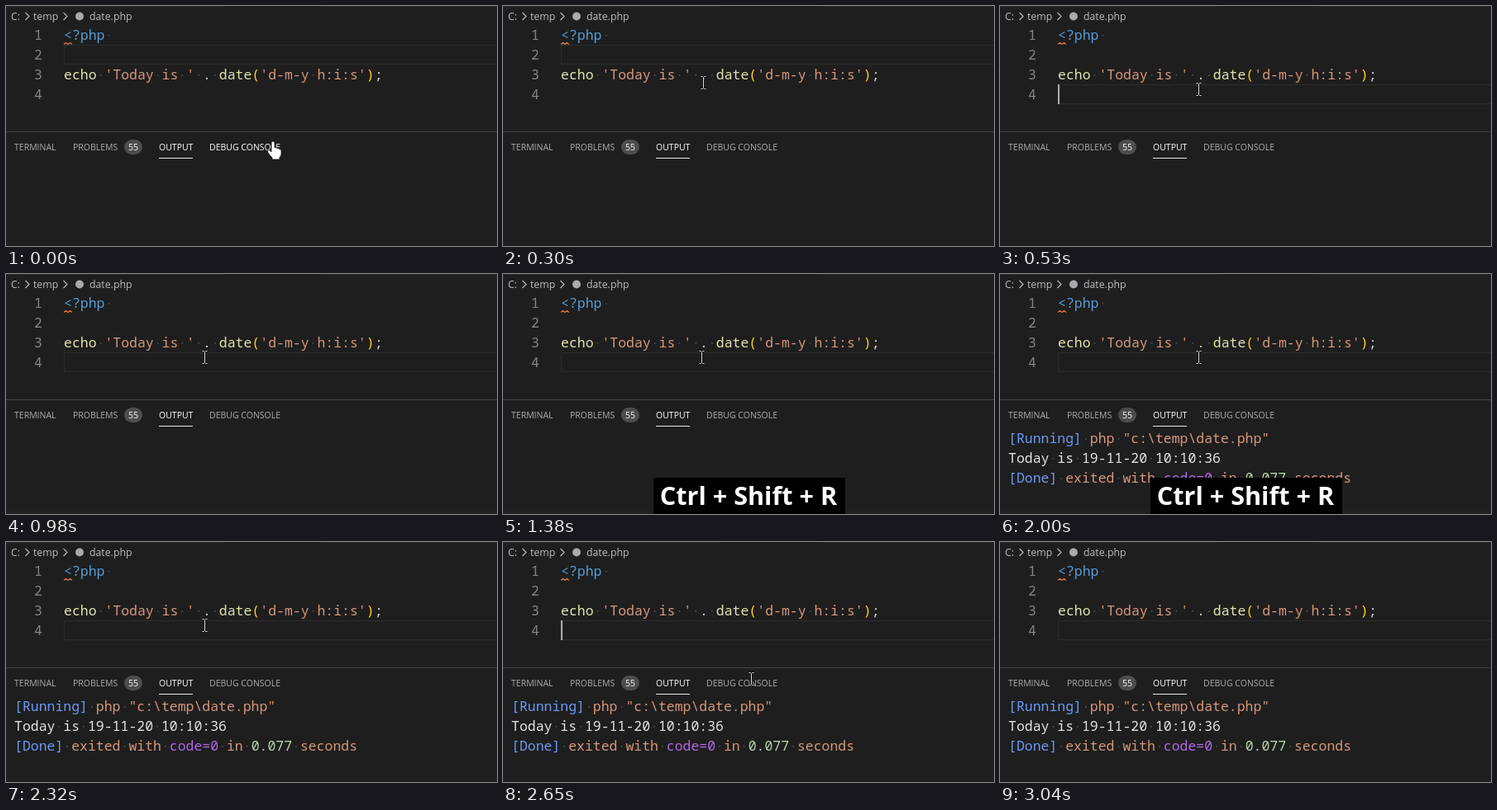
An HTML page for the animation above (3510 ms loop, 594 by 291 pixels).

```html
<!DOCTYPE html>
<html lang="en">
<head>
<meta charset="utf-8">
<title>Running a PHP script</title>
<style>
  html, body { margin: 0; width: 100%; height: 100%; overflow: hidden; background: #1e1e1e; }
  svg { display: block; width: 594px; height: 291px; }
  text { white-space: pre; }
  .mono { font: 500 16.48px "Noto Sans Mono", "DejaVu Sans Mono", monospace; }
  .crumb { font: 12.3px "Open Sans", "Noto Sans", sans-serif; fill: #bebebe; }
  .tab { font: 10.5px "Open Sans", "Noto Sans", sans-serif; fill: #adadad; }
  .tab.lit { fill: #fff; }
  .keys { font: bold 30.6px "Open Sans", "Noto Sans", sans-serif; fill: #fff; }
</style>
</head>
<body>
<svg id="stage" viewBox="0 0 594 291" xmlns="http://www.w3.org/2000/svg"></svg>
<script>
const LOOP = 3510;
const stage = document.getElementById('stage');

function add(tag, attrs, text, parent = stage) {
  const node = document.createElementNS('http://www.w3.org/2000/svg', tag);
  for (const key in attrs) node.setAttribute(key, attrs[key]);
  if (text) node.textContent = text;
  parent.appendChild(node);
  return node;
}

const rect = (x, y, width, height, fill, more) => add('rect', { x, y, width, height, fill, ...more });
const label = (kind, x, y, text) => add('text', { class: kind, x, y }, text);
const show = (node, on) => node.setAttribute('visibility', on ? 'visible' : 'hidden');

// A monospaced line from [text, colour] pairs, with spaces shown as faint dots.
function codeLine(x, y, ...parts) {
  const line = add('text', { class: 'mono', x, y });
  for (const [text, fill] of parts)
    for (const piece of text.split(/( )/))
      if (piece) add('tspan', { fill: piece === ' ' ? '#464646' : fill }, piece === ' ' ? '·' : piece, line);
  return line;
}

const BLUE = '#569cd6', SAND = '#e2e2b0', CLAY = '#d6977c', PLAIN = '#dcdcdc',
      GOLD = '#ffd21c', TAG = '#6a9af5', PURPLE = '#b267e6', MINT = '#bbd5ae';

// Window edges
rect(0, 0, 594, 291, '#1e1e1e');
rect(0, 0, 264, 1, '#292929');
rect(384, 0, 210, 1, '#252526');
rect(0, 286, 594, 5, '#221f21');

// Breadcrumb
label('crumb', 6, 17, 'C:');
label('crumb', 33, 17, 'temp');
label('crumb', 101, 17, 'date.php');
for (const x of [23.5, 69.5])
  add('path', { d: `M${x} 8l4.5 4.5l-4.5 4.5`, fill: 'none', stroke: '#bebebe', 'stroke-width': 1.1 });
add('circle', { cx: 89, cy: 12.5, r: 5, fill: '#a9a9ae' });

// Editor
const lineBox = rect(70.5, 0, 530, 23, 'none', { stroke: '#2b2b2b', 'stroke-width': 1.3 });
for (let n = 1; n <= 4; n++) codeLine(34, 17 + 24 * n, [String(n), '#858585']);
codeLine(70, 41, ['<?php ', BLUE]);
codeLine(70, 89, ['echo ', SAND], ["'Today is ' ", CLAY], ['. ', PLAIN], ['date', SAND],
  ['(', GOLD], ["'d-m-y h:i:s'", CLAY], [')', GOLD], [';', PLAIN]);
add('path', { d: 'M70 46.5l2.5-2l2.5 2l2.5-2l2.5 2', fill: 'none', stroke: '#e07a4a', 'stroke-width': 1.1 });
const caret = rect(70, 95, 2, 24, '#aeafad');

// Panel
rect(0, 152, 594, 1, '#424242');
label('tab', 10, 175, 'TERMINAL');
label('tab', 81, 175, 'PROBLEMS');
rect(143, 162, 22, 18, '#4d4d4d', { rx: 9 });
label('tab lit', 148, 175, '55');
label('tab lit', 185, 175, 'OUTPUT');
rect(185, 184, 41, 1, '#e7e7e7');
const debugTab = label('tab', 246, 175, 'DEBUG CONSOLE');

const output = [
  [1700, codeLine(10, 205, ['[Running]', TAG], [' php "c:\\temp\\date.php"', CLAY])],
  [1770, codeLine(10, 229, ['Today is 19-11-20 10:10:36', '#e4e4e4'])],
  [1770, codeLine(10, 253, ['[Done]', TAG], [' exited with ', CLAY], ['code=0', PURPLE],
    [' in ', CLAY], ['0.077', MINT], [' seconds', CLAY])]
];

// Key overlay
const overlay = add('g', {});
add('rect', { x: 182, y: 247, width: 232, height: 44, fill: '#000' }, '', overlay);
add('text', { class: 'keys', x: 189.8, y: 280 }, 'Ctrl + Shift + R', overlay);

// Mouse pointers
const beam = add('g', { fill: 'none' });
for (const [stroke, width] of [['#111', 2.4], ['#dcdcdc', 1]])
  add('path', { d: 'M-3 -7.5H-1L0 -6.5L1 -7.5H3M0 -6.5V6.5M-3 7.5H-1L0 6.5L1 7.5H3', stroke, 'stroke-width': width }, '', beam);
const hand = add('path', {
  d: 'M321 166q0-2 2-2t2 2v6q2-1 3 .6q2-.6 2.6 1q2.4-.4 2.4 2v4q0 2-2 4v2.4h-9v-2q-3-3-5.6-7q-.6-2 1.4-2.2q1.6 0 3.2 2z',
  fill: '#fff', stroke: '#111', 'stroke-width': .8
});

// The pointer moves in hard steps: [start, x, y].
const pointer = [
  [70, 281, 125], [140, 246, 88], [300, 242, 93], [370, 241, 96], [440, 240, 99], [510, 240, 101],
  [2470, 245, 106], [2540, 262, 124], [2610, 300, 166], [2680, 350, 222], [2750, 402, 276]
];
const CLICK = 510, POINTER_GONE = 2890;
const caretSpans = [[CLICK, 980], [1550, 2000], [2470, 3040]];

function draw(t) {
  const within = (from, to) => t >= from && t < to;
  const pose = pointer.filter(step => step[0] <= t).pop();

  show(hand, !pose);
  debugTab.setAttribute('class', pose ? 'tab' : 'tab lit');
  show(beam, pose && t < POINTER_GONE);
  if (pose) beam.setAttribute('transform', `translate(${pose[1] + .5} ${pose[2]})`);

  lineBox.setAttribute('y', t < CLICK ? 47.5 : 95.5);
  show(caret, caretSpans.some(span => within(...span)));
  for (const [start, line] of output) show(line, t >= start);
  show(overlay, within(1380, 2320));
}

const begin = performance.now();
function tick() {
  draw((performance.now() - begin) % LOOP);
  requestAnimationFrame(tick);
}
tick();
</script>
</body>
</html>
```
